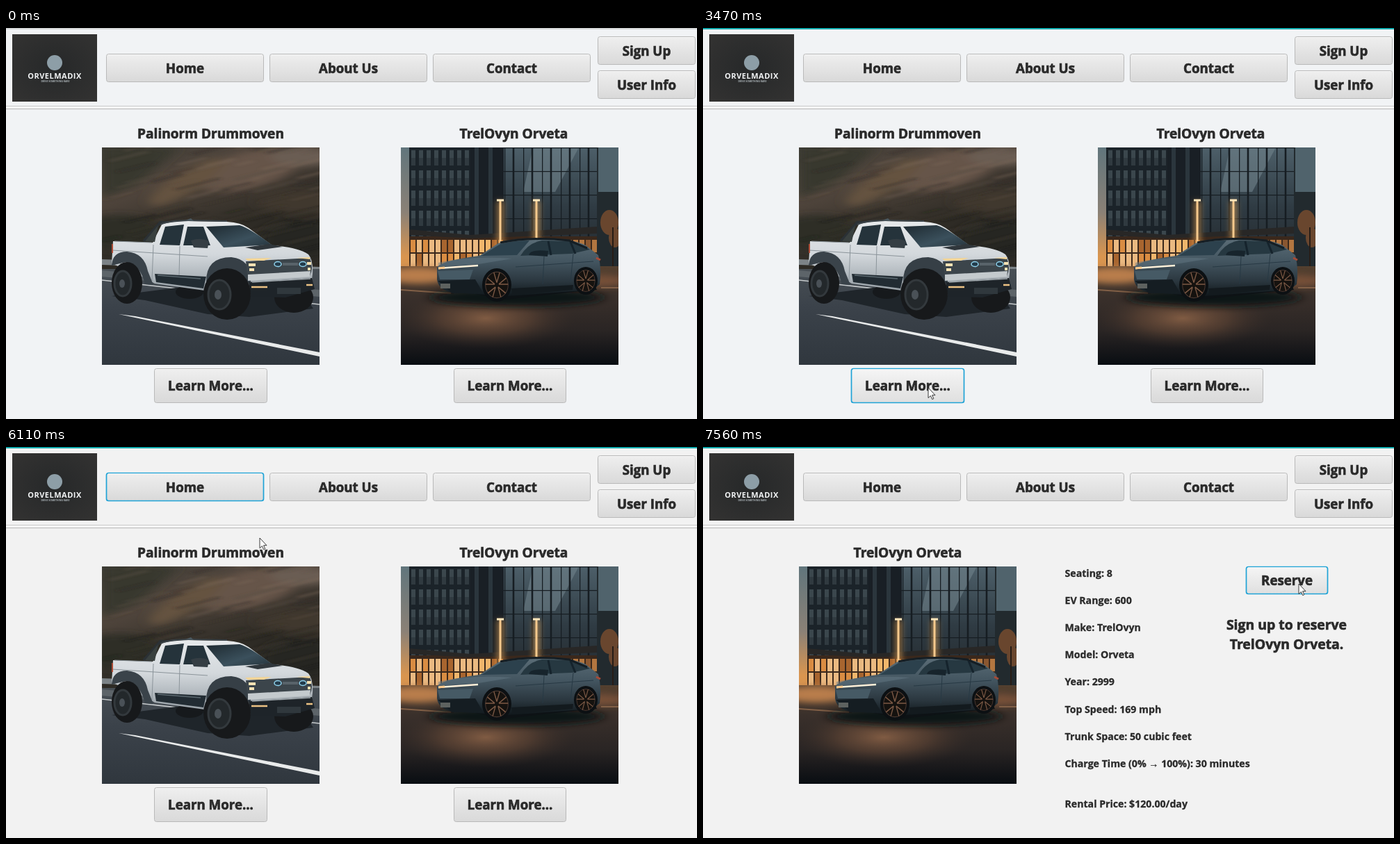
Write an HTML page that moves like this. It is 994x563 px and loops after 8000 ms.

```html
<!DOCTYPE html>
<html lang="en">
<head>
<meta charset="utf-8">
<title>Car rental</title>
<style>
html, body { margin: 0; width: 100%; height: 100%; overflow: hidden; background: #f2f2f2; }
#stage { display: block; }
text { font: 700 18.7px "Open Sans", "Noto Sans", sans-serif; fill: #2a2a2a; stroke: #2a2a2a; stroke-width: .65px; }
.mid { text-anchor: middle; }
.title { font-size: 19.1px; }
.note { font-size: 19.4px; }
.spec { font-size: 14.15px; stroke-width: .3px; }
.arrow { font-weight: 400; }
.brand { font-size: 11px; letter-spacing: .5px; fill: #f2f4f5; stroke: none; }
.tag { font-size: 3.4px; fill: #aab2b6; stroke: none; }
.btn rect { fill: url(#face); stroke: #b9b9b9; }
.btn .shine { fill: none; stroke: #f8f8f8; stroke-opacity: .75; }
.btn.hover rect { fill: url(#faceHover); }
.btn.focus rect { stroke: #1fa3d6; stroke-width: 1.7; }
</style>
</head>
<body>
<svg id="stage" width="994" height="563" viewBox="0 0 994 563">
<defs>
  <linearGradient id="face" x2="0" y2="1"><stop stop-color="#efefef"/><stop offset="1" stop-color="#d9d9d9"/></linearGradient>
  <linearGradient id="faceHover" x2="0" y2="1"><stop stop-color="#f5f5f5"/><stop offset="1" stop-color="#dfdfdf"/></linearGradient>
  <radialGradient id="tile" r=".8"><stop stop-color="#262829"/><stop offset="1" stop-color="#353433"/></radialGradient>
  <linearGradient id="hill" x2=".3" y2="1"><stop stop-color="#3f3d37"/><stop offset=".22" stop-color="#51463d"/><stop offset=".5" stop-color="#2e2b25"/></linearGradient>
  <linearGradient id="road" x2="0" y2="1"><stop stop-color="#484f55"/><stop offset=".4" stop-color="#3b424a"/><stop offset="1" stop-color="#30373e"/></linearGradient>
  <linearGradient id="white" x2="0" y2="1"><stop stop-color="#e6e9eb"/><stop offset=".45" stop-color="#d3d8dc"/><stop offset="1" stop-color="#8e979e"/></linearGradient>
  <linearGradient id="glass" x2="1" y2="1"><stop stop-color="#1d2930"/><stop offset=".6" stop-color="#3b505c"/><stop offset="1" stop-color="#26343c"/></linearGradient>
  <linearGradient id="dusk" x2="0" y2="1"><stop stop-color="#61757c"/><stop offset=".3" stop-color="#8b8176"/><stop offset=".5" stop-color="#d9954f"/></linearGradient>
  <linearGradient id="front" x2="0" y2="1"><stop stop-color="#4d5f69"/><stop offset=".5" stop-color="#2f3b43"/><stop offset="1" stop-color="#22272b"/></linearGradient>
  <linearGradient id="plaza" x2="0" y2="1"><stop stop-color="#54402f"/><stop offset=".3" stop-color="#3a302b"/><stop offset=".65" stop-color="#2a2524"/><stop offset="1" stop-color="#090d12"/></linearGradient>
  <linearGradient id="paint" x2="0" y2="1"><stop stop-color="#5b6d77"/><stop offset=".4" stop-color="#435560"/><stop offset=".75" stop-color="#2a363e"/><stop offset="1" stop-color="#10171b"/></linearGradient>
  <radialGradient id="pool"><stop stop-color="#94684a" stop-opacity=".8"/><stop offset=".5" stop-color="#6d4d39" stop-opacity=".5"/><stop offset="1" stop-color="#3a2e28" stop-opacity="0"/></radialGradient>
  <pattern id="bays" x="580" y="172" width="11" height="29" patternUnits="userSpaceOnUse"><path d="M0 0H11V29H0Z" fill="#1b2329"/><path d="M3 4H9V26H3Z" fill="#3b474d"/><path d="M3 15H9V26H3Z" fill="#303a40"/></pattern>
  <pattern id="panes" x="717" y="172" width="27" height="34" patternUnits="userSpaceOnUse"><path d="M0 0H27M0 0V34M13 0V34" stroke="#161d22" stroke-width="2.6"/></pattern>
  <filter id="soft" x="-50%" y="-50%" width="200%" height="200%"><feGaussianBlur stdDeviation="9 5"/></filter>
  <filter id="blur" x="-10%" y="-10%" width="120%" height="120%"><feGaussianBlur stdDeviation="4 1"/></filter>
  <filter id="glow" x="660" y="220" width="160" height="140" filterUnits="userSpaceOnUse"><feGaussianBlur stdDeviation="4"/></filter>
</defs>

<rect id="back" width="994" height="563"/>
<rect id="edge" width="994" height="2"/>
<path d="M0 112.5H994" stroke="#cacaca"/>
<path d="M0 114.5H994" stroke="#fbfbfb" stroke-width="2"/>
<path d="M0 116.5H994" stroke="#c6c6c6" stroke-width="1.6"/>

<rect x="9" y="9" width="122" height="97" fill="url(#tile)"/>
<circle cx="70" cy="50" r="11" fill="#8d9ea7"/>
<text class="mid brand" x="70" y="73">ORVELMADIX</text>
<text class="mid tag" x="71" y="77.5">DRIVE SOMETHING RARE</text>

<svg data-on="home truck" x="138" y="172" width="313" height="313" viewBox="138 172 313 313">
  <path d="M138 172H451V485H138Z" fill="url(#hill)"/>
  <g filter="url(#soft)">
    <path d="M138 172H250L190 225L138 245Z" fill="#37372f"/>
    <ellipse cx="350" cy="205" rx="75" ry="26" fill="#66544a" transform="rotate(-14 350 205)"/>
    <ellipse cx="260" cy="222" rx="62" ry="16" fill="#65533f" transform="rotate(-30 260 222)"/>
    <ellipse cx="425" cy="185" rx="45" ry="14" fill="#6b5d52"/>
    <ellipse cx="420" cy="250" rx="60" ry="17" fill="#41382f"/>
    <ellipse cx="165" cy="295" rx="65" ry="26" fill="#2e2f27"/>
    <ellipse cx="425" cy="305" rx="60" ry="30" fill="#282823"/>
  </g>
  <g id="streaks" filter="url(#blur)" fill="none"></g>
  <path d="M138 333L451 344V352L138 341Z" fill="#7c8387"/>
  <path d="M138 347H451V485H138Z" fill="url(#road)"/>
  <path d="M138 349L451 377V387L138 358Z" fill="#5d6469"/>
  <path d="M138 363L451 398" stroke="#c6cacc" stroke-width="1.6"/>
  <path d="M162 412L186 415L451 467V473Z" fill="#e9ebeb"/>
  <path d="M152 386L200 392L290 412L350 416L442 404L430 386L260 372Z" fill="#1f252a"/>
  <ellipse cx="264" cy="380" rx="20" ry="10" fill="#16191c"/>
  <ellipse cx="414" cy="388" rx="28" ry="22" fill="#17191b"/>
  <path d="M198 307L222 280H268" fill="none" stroke="#2b3135" stroke-width="4"/>
  <path d="M154 307L211 309L224 283Q234 279 262 278L318 279Q338 280 349 288L383 313Q420 316 435 326Q442 334 441 354L439 370L352 385L300 380L214 368L196 358L152 339Z" fill="url(#white)"/>
  <path d="M200 307L219 284L214 308Z" fill="#39403f"/>
  <path d="M222 283Q234 277 262 277L318 278" fill="none" stroke="#3b4348" stroke-width="2"/>
  <path d="M258 277L266 274L270 278Z" fill="#4b5960"/>
  <path d="M156 307L210 309M212 312L210 364M250 314L249 356M153 320L290 329" fill="none" stroke="#8b949a"/>
  <path d="M221 312L229 286L256 283L250 313Z" fill="#25333b"/>
  <path d="M255 313L261 286L284 286L294 313Z" fill="#25333b"/>
  <path d="M288 286L336 284Q350 288 382 312L313 316Z" fill="url(#glass)"/>
  <path d="M266 306Q280 301 292 307L290 317L270 316Z" fill="#353e44"/>
  <path d="M344 316L379 311L398 315L362 320Z" fill="#30373c"/>
  <path d="M152 342Q153 322 174 322Q199 324 204 350L212 370L200 369Q193 340 172 337Z" fill="#3a434a"/>
  <path d="M214 354L288 358L284 375L216 366Z" fill="#222c33"/>
  <path d="M218 356L280 361" stroke="#5c6970" stroke-width="1.5"/>
  <path d="M288 365Q288 330 324 330Q354 333 352 366L343 370Q337 346 316 347Q296 349 292 374Z" fill="#363f46"/>
  <path d="M345 336L437 331Q443 346 437 357L348 363Z" fill="#3c454b"/>
  <path d="M348 355L438 350L437 358L348 364Z" fill="#c4cacd"/>
  <path d="M344 332L382 331L371 335L348 335ZM418 331L437 330V333Z" fill="#f3d597"/>
  <path d="M349 341H359M350 348H357M433 339H439M434 347H438" stroke="#f6e2b4" stroke-width="4"/>
  <path d="M398 340H420" stroke="#59636a" stroke-width="4"/>
  <g fill="#233c4b" stroke="#90d3ee" stroke-width="1.5"><ellipse cx="391" cy="340" rx="5" ry="3.5"/><ellipse cx="427" cy="340" rx="5" ry="3.5"/></g>
  <path d="M349 366L440 360L444 376L402 388L352 387Z" fill="#1e2429"/>
  <path d="M354 366L438 361" stroke="#9ca4a9" stroke-width="1.5"/>
  <path d="M353 373H376M432 370H441" stroke="#ecc284" stroke-width="2.4"/>
  <path d="M390 374H424V383H390Z" fill="#30383d"/>
  <g fill="#17191b"><ellipse cx="174" cy="367" rx="22" ry="30"/><ellipse cx="318" cy="383" rx="34" ry="37"/></g>
  <g fill="#23282b" stroke="#33393d" stroke-width="3"><ellipse cx="168" cy="368" rx="12" ry="18"/><ellipse cx="307" cy="384" rx="16" ry="21"/></g>
  <g fill="#4a5157"><ellipse cx="167" cy="368" rx="4" ry="6"/><ellipse cx="305" cy="384" rx="5" ry="7"/></g>
  <path d="M152 311H154V324H152Z" fill="#ad4b34"/>
</svg>

<svg id="suv" data-on="home suv" y="172" width="313" height="313" viewBox="568 172 313 313">
  <path d="M568 172H881V485H568Z" fill="url(#dusk)"/>
  <path d="M580 172H668V345H580Z" fill="url(#bays)"/>
  <path d="M668 172H716V345H668Z" fill="#191f25"/>
  <path d="M677 172V315M697 172V315" stroke="#2b363d" stroke-width="6"/>
  <path d="M716 172H850V345H716Z" fill="url(#front)"/>
  <path d="M758 172H824L790 236H744Z" fill="#70838b" opacity=".6"/>
  <path d="M716 172H850V345H716Z" fill="url(#panes)"/>
  <path d="M850 172H881V345H850Z" fill="#222a2e"/>
  <path d="M852 172H881V236H852Z" fill="#50636c"/>
  <path d="M580 300H850V347H580Z" fill="#3a281c"/>
  <g id="lobby"></g>
  <path d="M580 290L668 298L850 286V296L668 303L580 298Z" fill="#282726"/>
  <g fill="#81502e" opacity=".75"><ellipse cx="868" cy="280" rx="13" ry="18"/><ellipse cx="876" cy="302" rx="9" ry="14"/></g>
  <path d="M873 287V347" stroke="#271d17" stroke-width="2"/>
  <path d="M711 249V326M763 249V310" stroke="#ffb75d" stroke-width="9" opacity=".55" filter="url(#glow)"/>
  <path d="M711 248V325M763 248V308" stroke="#f5c98d" stroke-width="3"/>
  <path d="M706 248H716M758 248H768" stroke="#ffe7bc" stroke-width="3"/>
  <path d="M568 343H881V485H568Z" fill="url(#plaza)"/>
  <g filter="url(#soft)">
    <ellipse cx="592" cy="356" rx="50" ry="12" fill="#b87d4c"/>
    <ellipse cx="850" cy="364" rx="45" ry="9" fill="#765039"/>
  </g>
  <ellipse cx="690" cy="418" rx="130" ry="44" fill="url(#pool)"/>
  <path d="M568 377L640 382M856 374H881" stroke="#826047" stroke-width="2"/>
  <ellipse cx="735" cy="388" rx="125" ry="13" fill="#0e1317" filter="url(#soft)"/>
  <path d="M640 376L700 388L720 391L816 380L850 377L845 368L640 368Z" fill="#0d1215"/>
  <path d="M620 345Q625 335 681 328L708 310Q726 303 766 303Q816 303 834 313L852 327Q857 346 854 369L844 377L722 386L642 381Q622 377 620 362Z" fill="url(#paint)"/>
  <path d="M684 328L711 311Q730 306 753 306L735 327Z" fill="#2c414d"/>
  <path d="M740 328Q751 309 771 306L810 307Q829 312 840 319L814 325Z" fill="#263841"/>
  <path d="M780 307L784 327M812 308L819 325" stroke="#15232c" stroke-width="3"/>
  <path d="M711 309Q755 300 810 306L836 317" fill="none" stroke="#151e24" stroke-width="3"/>
  <path d="M752 327Q754 318 780 321L779 329Z" fill="#17242c"/>
  <path d="M622 338Q665 328 728 332L680 340L622 344Z" fill="#64798380"/>
  <path d="M622 346L679 342" stroke="#fff0d9" stroke-width="2.5"/>
  <path d="M622 346L631 345" stroke="#ffca8b" stroke-width="3"/>
  <path d="M621 350L672 348L667 362L624 362Z" fill="#465a65"/>
  <path d="M621 364L675 362L686 381L642 382Z" fill="#151d22"/>
  <path d="M625 368H639V375H625Z" fill="#5e625f"/>
  <path d="M727 375L816 370L815 377L728 385Z" fill="#131a1e"/>
  <path d="M733 344L845 336M774 329L772 369M816 325L812 365" fill="none" stroke="#273944"/>
  <path d="M849 331L855 334" stroke="#a74b37" stroke-width="3"/>
  <g id="rims"></g>
</svg>
<g id="ui"></g>
<path id="cursor" d="M0 0V14.6L3.4 11.5L5.7 16.6L7.8 15.7L5.6 10.7H10Z" fill="#fff" stroke="#242424" stroke-width=".9"/>
</svg>
<script>
const LOOP = 8000;
const $ = id => document.getElementById(id);
const truck = ['Palinorm', 'Drummoven'], suv = ['TrelOvyn', 'Orveta'];
const buttons = [];

const text = (x, y, cls, label) => `<text x="${x}" y="${y}" class="${cls}">${label}</text>`;
const group = (on, body) => `<g data-on="${on}">${body}</g>`;
const repeat = (n, make) => Array.from({ length: n }, (_, i) => make(i)).join('');

let seed = 7;
const rnd = () => (seed = seed * 16807 % 2147483647) / 2147483647;
const pick = list => list[Math.floor(rnd() * list.length)];

function button(id, x, y, w, h, label, on = 'home truck suv') {
  buttons.push({ id, x, y, w, h });
  return `<g id="${id}" class="btn" data-on="${on}">
    <rect x="${x + .5}" y="${y + .5}" width="${w - 1}" height="${h - 1}" rx="3"/>
    <path class="shine" d="M${x + 3} ${y + 1.5}h${w - 6}"/>
    ${text(x + w / 2, y + h / 2 + 7, 'mid', label)}</g>`;
}

// One row every 39 px; the price stands half a row lower.
function specs(x, rows, price) {
  const last = 187 + 39 * (rows.length + .5);
  return rows.map((row, i) => text(x, 187 + 39.1 * i, 'spec', row)).join('')
    + text(x, last, 'spec', `Rental Price: $${price}.00/day`);
}

const note = name => text(839.5, 263, 'mid note', 'Sign up to reserve')
  + text(839.5, 291, 'mid note', name.join(' ') + '.');

function rim(cx, cy, rx, ry) {
  const spokes = repeat(5, i => `<path d="M0 -3L-4 -15M0 -3L4 -15" transform="rotate(${i * 72})"/>`);
  return `<g transform="translate(${cx} ${cy}) scale(${rx / 20} ${ry / 20})">
    <circle r="20" fill="#0c1013"/><circle r="15.5" fill="#15120f" stroke="#4a3830"/>
    <g stroke="#7d5a46" stroke-width="1.3">${spokes}</g></g>`;
}

$('streaks').innerHTML = repeat(90, () => {
  const y = 172 + rnd() * 150, w = 20 + rnd() * 50;
  const color = pick(y < 250 ? ['#7b6758', '#2f2b26', '#5b5246'] : ['#1f201b', '#3d372d']);
  return `<path d="M${138 + rnd() * 300} ${y}l${w} ${-w * .25}" stroke="${color}"
    stroke-width="${1 + rnd() * 4}" opacity=".4"/>`;
});
$('lobby').innerHTML = repeat(60, i => {
  const x = 582 + (i >> 1) * 9, y = i % 2 ? 325 : 305;
  const color = pick(x < 715 ? ['#f0b66c', '#d98c42', '#a8652f', '#eab981'] : ['#8a5730', '#b27640', '#4b3524']);
  return `<rect x="${x}" y="${y}" width="7" height="18" fill="${color}"/>`;
});
$('rims').innerHTML = rim(706, 370, 21, 24) + rim(834, 364, 17, 20);
$('ui').innerHTML =
  button('home', 144, 37, 227, 41, 'Home') +
  button('about', 379, 37, 227, 41, 'About Us') +
  button('contact', 614, 37, 227, 41, 'Contact') +
  button('sign', 851, 12, 141, 41, 'Sign Up') +
  button('user', 851, 61, 141, 41, 'User Info') +
  button('learn1', 213, 490, 163, 50, 'Learn More...', 'home') +
  button('learn2', 644, 490, 162, 50, 'Learn More...', 'home') +
  button('reserve', 781, 172, 118, 40, 'Reserve', 'truck suv') +
  group('home truck', text(294.5, 159, 'mid title', truck.join(' '))) +
  group('home', text(730.5, 159, 'mid title', suv.join(' '))) +
  group('suv', text(294.5, 159, 'mid title', suv.join(' '))) +
  group('truck', specs(526, ['Seating: 5', 'Mile Range: 800', `Make: ${truck[0]}`, `Model: ${truck[1]}`,
    'Year: 3000', 'Top Speed: 140 mph', 'Towing Capacity: 6900'], 100)) +
  group('suv', specs(520.5, ['Seating: 8', 'EV Range: 600', `Make: ${suv[0]}`, `Model: ${suv[1]}`,
    'Year: 2999', 'Top Speed: 169 mph', 'Trunk Space: 50 cubic feet',
    'Charge Time (0% <tspan class="arrow">→</tspan> 100%): 30 minutes'], 120)) +
  `<g id="note1">${note(truck)}</g><g id="note2">${note(suv)}</g>`;

const smooth = u => u * u * (3 - 2 * u);
const out = u => 1 - (1 - u) ** 2;

// Pointer moves: start, step length, steps, then from, bend, to.
const moves = [
  { at: 730, step: 70, n: 12, p: [[960, 556], [600, 168], [383, 180]], ease: smooth },
  { at: 1830, step: 70, n: 4, p: [[383, 180], [381, 188], [376, 191]], ease: smooth },
  { at: 2510, step: 70, n: 7, p: [[376, 191], [275, 380], [324, 518]], ease: smooth },
  { at: 3800, step: 69, n: 11, p: [[324, 518], [600, 330], [842, 196]], ease: smooth },
  { at: 5170, step: 66.6, n: 7, p: [[842, 196], [569, 216], [300, 55]], ease: out },
  { at: 5970, step: 69, n: 12, p: [[300, 55], [508, 300], [715, 520]], ease: smooth },
  { at: 6800, step: 69, n: 11, p: [[715, 520], [760, 330], [857, 197]], ease: smooth }
];

// Each value holds from its time on.
const pages = [[0, 'home'], [3540, 'truck'], [5970, 'home'], [6800, 'suv']];
const focuses = [[0, ''], [3400, 'learn1'], [3540, 'home'], [4560, 'reserve'], [5970, 'home'],
  [6730, 'learn2'], [6800, 'home'], [7490, 'reserve']];
const backs = [[0, '#f1f3f5'], [3540, '#f4f6f5'], [5970, '#f2f2f2']];
const edges = [[0, '#d3d5d6'], [3400, '#08a9ac']];
const held = (track, t) => track.findLast(k => k[0] <= t)[1];

function pointer(t) {
  const m = moves.findLast(k => k.at <= t);
  if (!m) return null;
  const s = m.ease(Math.min(1, (Math.floor((t - m.at) / m.step) + 1) / m.n));
  const [a, b, c] = m.p;
  return [0, 1].map(i => (1 - s) ** 2 * a[i] + 2 * s * (1 - s) * b[i] + s * s * c[i]);
}

const show = (el, on) => { el.style.display = on ? '' : 'none'; };
const parts = [...document.querySelectorAll('[data-on]')];

function draw(now) {
  const t = now % LOOP;
  const page = held(pages, t), focus = held(focuses, t), pos = pointer(t);
  parts.forEach(el => show(el, el.dataset.on.split(' ').includes(page)));
  show($('note1'), t >= 4630 && t < 5970);
  show($('note2'), t >= 7560);
  $('suv').setAttribute('x', page === 'suv' ? 138 : 568);
  $('back').setAttribute('fill', held(backs, t));
  $('edge').setAttribute('fill', held(edges, t));
  for (const b of buttons) {
    const over = pos && pos[0] >= b.x && pos[0] < b.x + b.w && pos[1] >= b.y && pos[1] < b.y + b.h;
    $(b.id).classList.toggle('hover', !!over);
    $(b.id).classList.toggle('focus', b.id === focus);
  }
  show($('cursor'), pos);
  if (pos) $('cursor').setAttribute('transform', `translate(${pos.map(Math.round)})`);
}

function tick() {
  draw(performance.now());
  requestAnimationFrame(tick);
}
tick();
</script>
</body>
</html>
```
